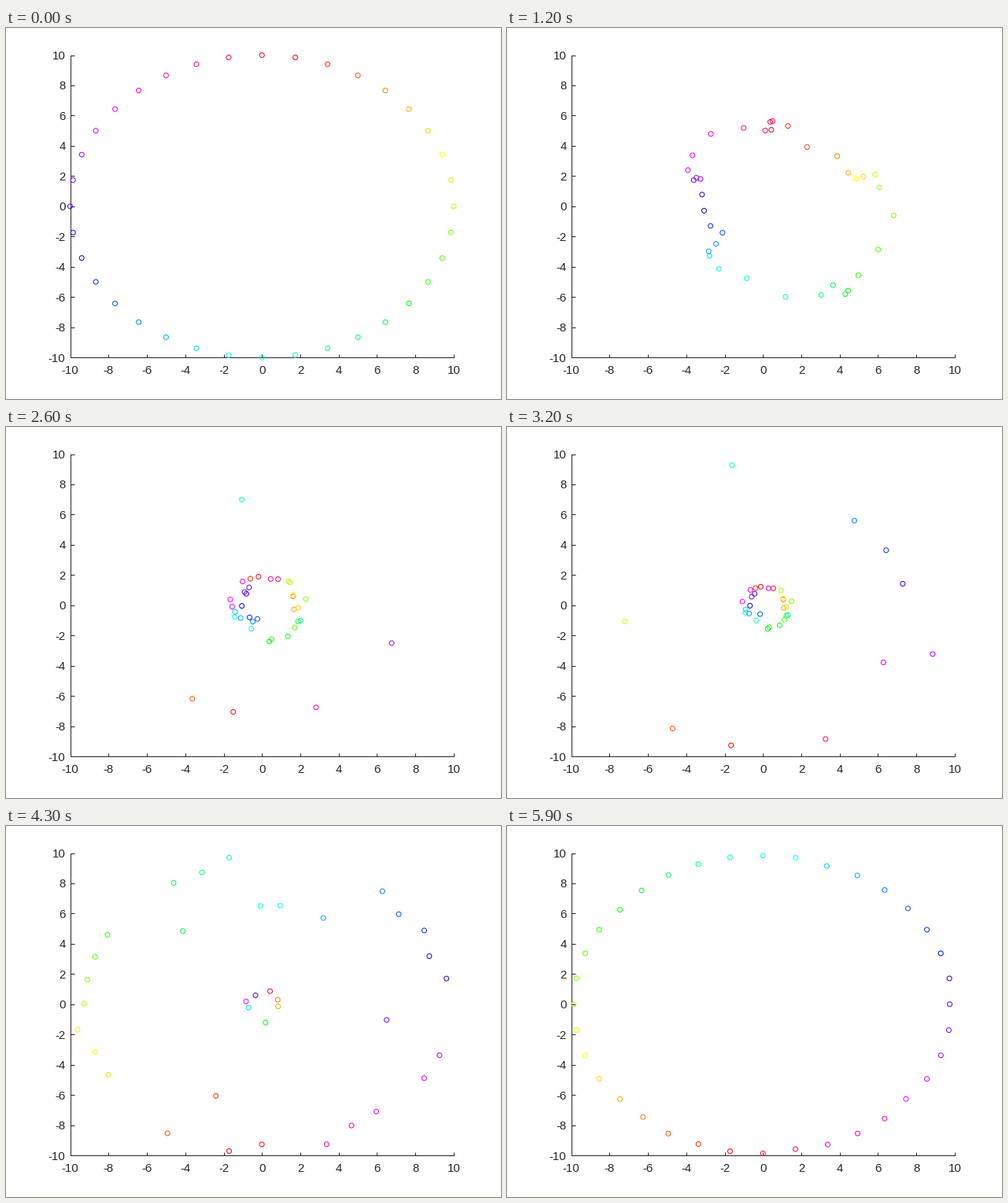
Recreate the animation shown at these times as a matplotlib script. Size 629 by 472 pixels, loop 6 s.

```python
import numpy as np
import matplotlib.pyplot as plt
from matplotlib.animation import FuncAnimation
from matplotlib.colors import hsv_to_rgb

W, H, DPI = 629, 472, 100
FRAMES, INTERVAL = 60, 100
N = 36
PX = 72 / DPI  # one pixel in points
INK = "#262626"

DECAY = 0.75  # share of the way home left after each free step
MAIN_WAVE = 33
WAVES = {
    21: (1, 3, 17, 29, 34),
    27: (8, 22, 24, 26, 30),
    39: (2, 14, 18, 19, 21, 28),
    44: (4, 5, 13, 20, 27, 31, 35),
}

# Agents stand clockwise on a circle, the first one on top
index = np.arange(N)
angle = 90 - 10 * index


def polar(radius, degrees):
    a = np.radians(degrees)
    return np.column_stack((radius * np.cos(a), radius * np.sin(a)))


def wave(count, peak):
    """Cosine around the circle with the given number of peaks."""
    return np.cos(2 * np.pi * count * (index - peak) / N)


home = polar(-9.87, angle)
leave = np.full(N, float(MAIN_WAVE))
for time, group in WAVES.items():
    leave[list(group)] = time

# The ring shrinks unevenly, and neighbours bunch up in five clusters
rng = np.random.default_rng(4)
uneven = 0.26 * wave(1, 9) + 0.18 * wave(2, 14) + rng.uniform(-0.1, 0.1, N)
cluster = 12 * wave(5, 1.5)
lag = 7 * (wave(1, 9) - 1)


def crowd(t):
    """Places of agents that are still pushing towards the middle."""
    ring = np.interp(t, [0, 7, 12, 20, 32, 59], [10, 7.8, 5, 2.3, 1.1, 0.5])
    grip = min(t / 12, 1)
    swirl = (min(t, 24) / 12) ** 2
    return polar(ring * (1 + grip * uneven),
                 angle + swirl * cluster + grip * lag)


def positions(t):
    left = DECAY ** np.maximum(0, t - leave)
    return home + (crowd(t) - home) * left[:, None]


plt.rcParams["font.family"] = "Liberation Sans"
fig = plt.figure(figsize=(W / DPI, H / DPI), dpi=DPI, facecolor="white")
ax = fig.add_axes([0.1296, 0.1119, 0.775, 0.815])
ax.set(xlim=(-10, 10), ylim=(-10, 10))
ticks = range(-10, 11, 2)
labels = [str(v) for v in ticks]
ax.set_xticks(ticks, labels)
ax.set_yticks(ticks, labels)
ax.tick_params(direction="in", length=4.5 * PX, width=PX, color=INK,
               labelcolor=INK, labelsize=15 * PX)
ax.tick_params(axis="x", pad=10 * PX)
ax.tick_params(axis="y", pad=6 * PX)
ax.spines[["top", "right"]].set_visible(False)
for side in ("left", "bottom"):
    ax.spines[side].set(linewidth=PX, color=INK)

hue = (index - 1) % N / N
colors = hsv_to_rgb(np.column_stack((hue, np.ones(N), np.ones(N))))
dots = ax.scatter(*crowd(0).T, s=(6 * PX) ** 2, facecolors="none",
                  edgecolors=colors, linewidths=PX, clip_on=False, zorder=3)


def draw(frame):
    dots.set_offsets(positions(frame))
    return (dots,)


anim = FuncAnimation(fig, draw, frames=FRAMES, interval=INTERVAL,
                     repeat=True, repeat_delay=0)
plt.show()
```
